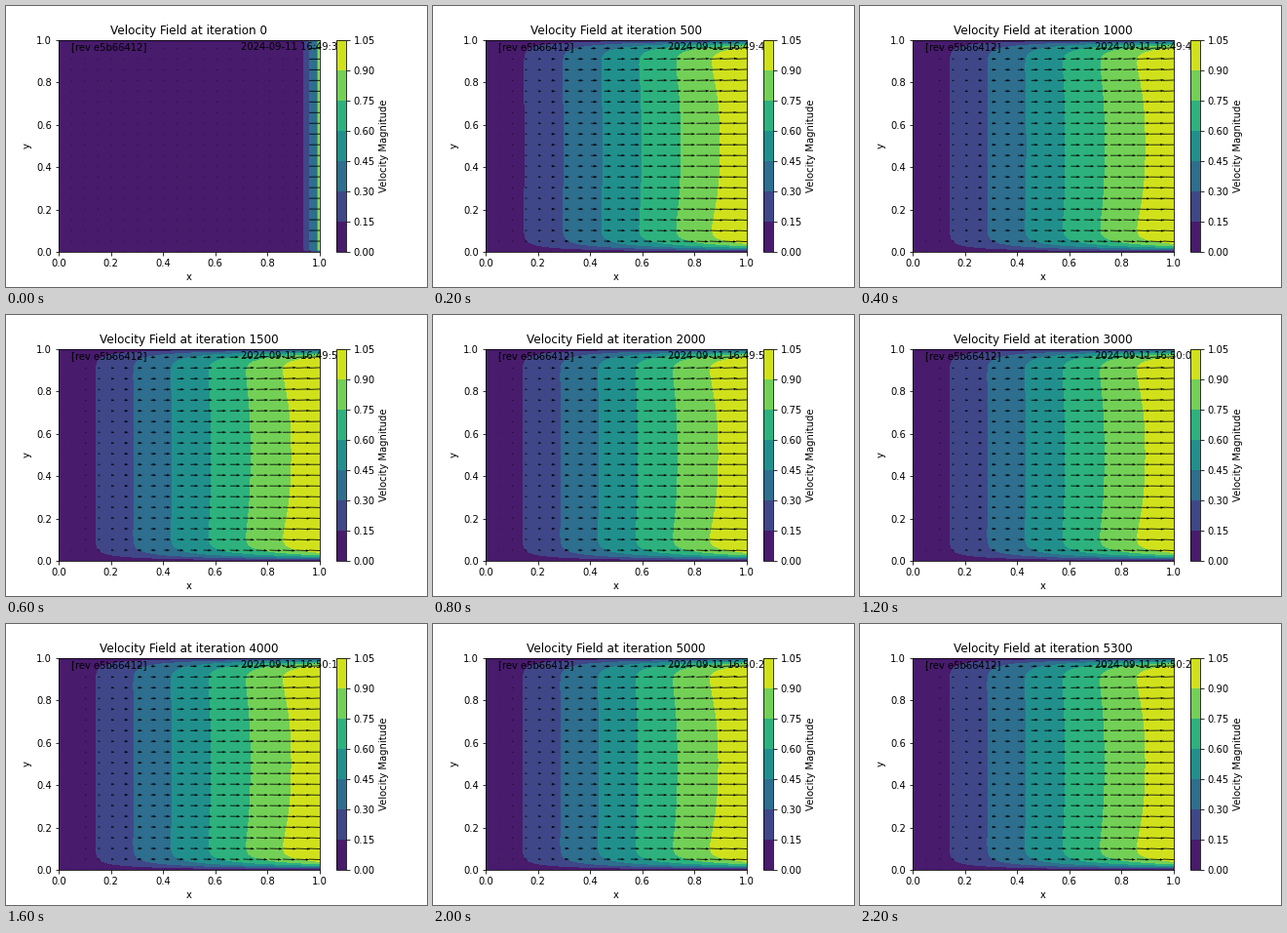
Animation, 432 px wide and 288 px high, one loop 2.4 s. Source, as a matplotlib script:

```python
import numpy as np
import matplotlib.pyplot as plt
from matplotlib.animation import FuncAnimation

plt.rcParams.update({"font.family": "DejaVu Sans", "font.size": 10})

N, STRIDE = 100, 5
LEVELS = np.arange(8) * 0.15
STEPS = list(range(0, 5001, 500)) + [5300]
REV = "[rev e5b66412]"

axis = np.linspace(0, 1, N)
X, Y = np.meshgrid(axis, axis)
WALL = np.minimum(Y, 1 - Y)


def start_field():
    """Thin moving layer next to the driven right edge."""
    s = 1 - X
    u = 0.48 * np.clip(1 - (s / 0.08) ** 1.35, 0, 1)
    u += 0.003 * np.exp(-((s - 0.09) / 0.012) ** 2)
    u[:, -1] = 1
    return u * np.tanh(WALL / 0.005), np.zeros_like(u)


def developed_field(step):
    """Near-linear profile with wall layers, settling as steps go on."""
    gain = 1.04 - 0.037 * np.exp(-(step - 500) / 200)
    core = gain - (gain - 1) * X ** 2
    bulge = (0.01 + 0.057 * X ** 3) * np.exp(-(WALL / 0.22) ** 2)
    u = X * (core + bulge) * np.tanh(WALL / 0.032)
    u = np.minimum(u, 1.049)
    return u, 0.05 * u * X * (2 * Y - 1)


def clock(step):
    sec = 36 + step // 100
    return f"2024-09-11 16:{49 + sec // 60}:{sec % 60:02d}"


fig = plt.figure(figsize=(6, 4), dpi=72, facecolor="white")
fig.subplots_adjust(left=0.125, right=0.9, bottom=0.125, top=0.88)
ax = fig.add_subplot()


def draw(i):
    step = STEPS[i]
    u, v = developed_field(step) if step else start_field()
    ax.clear()
    fill = ax.contourf(X, Y, np.hypot(u, v), levels=LEVELS, cmap="viridis")
    pick = (slice(None, None, STRIDE),) * 2
    ax.quiver(X[pick], Y[pick], u[pick], v[pick])
    ax.set(xlim=(0, 1), ylim=(0, 1), xlabel="x", ylabel="y",
           title=f"Velocity Field at iteration {step}")
    ax.text(0.05, 0.95, REV, transform=ax.transAxes)
    ax.text(0.7, 0.95, clock(step), transform=ax.transAxes)
    return fill


fig.colorbar(draw(0), ax=ax, label="Velocity Magnitude")


def update(i):
    draw(i)
    return []


anim = FuncAnimation(fig, update, frames=len(STEPS), init_func=lambda: [],
                     interval=200, repeat=True, repeat_delay=0, blit=False)
plt.show()
```
